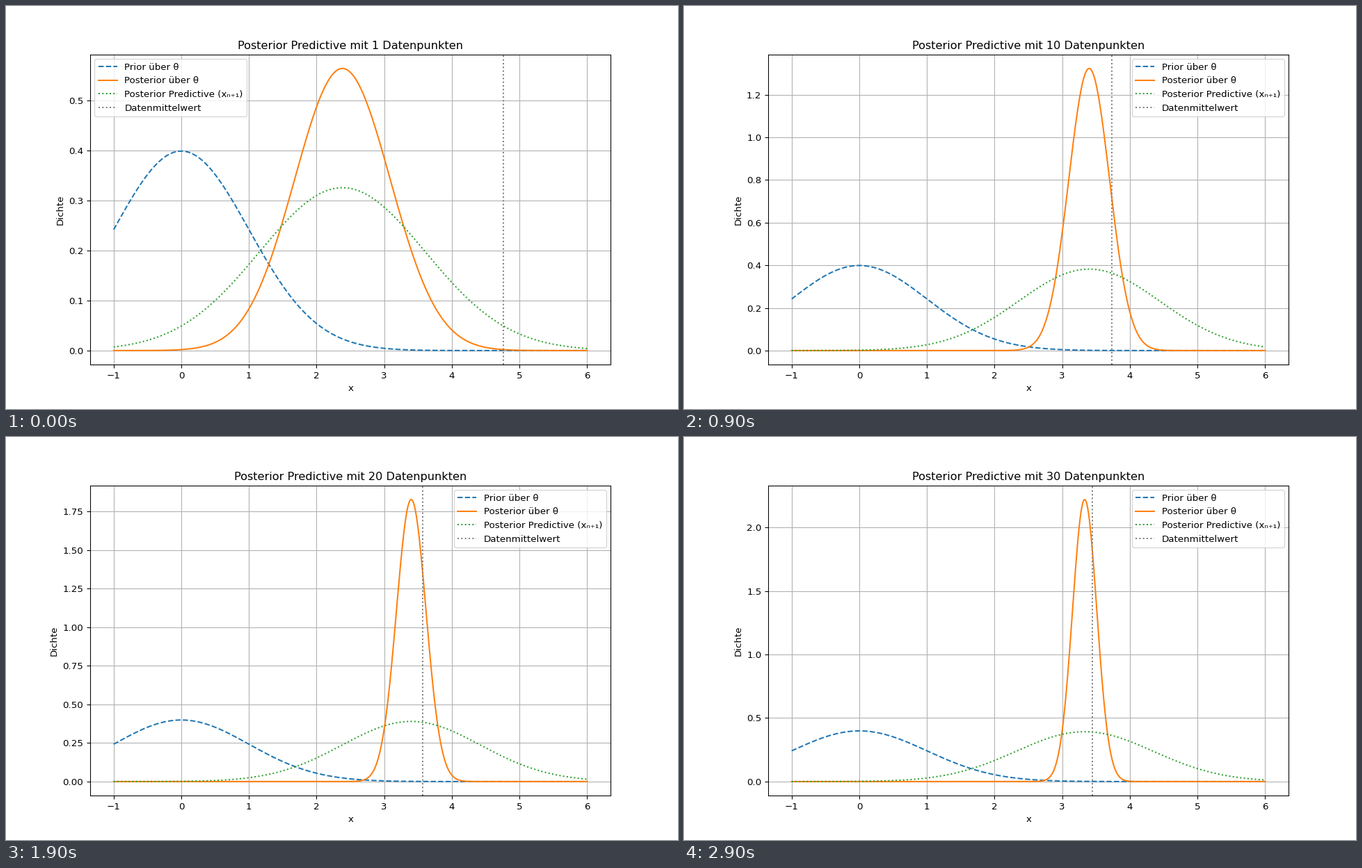
Recreate the animation shown at these times as a matplotlib script. Size 966x580 px, loop 3 s.

```python
import numpy as np
import matplotlib.pyplot as plt
from matplotlib.animation import FuncAnimation

WIDTH, HEIGHT, DPI = 966, 580, 96.6
N_POINTS = 30
PRIOR_MEAN, PRIOR_VAR, NOISE_VAR = 0.0, 1.0, 1.0

np.random.seed(0)
data = np.random.normal(3.0, 1.0, N_POINTS)
x = np.linspace(-1, 6, 500)


def normal_pdf(x, mean, var):
    return np.exp(-(x - mean) ** 2 / (2 * var)) / np.sqrt(2 * np.pi * var)


# The tiny margin keeps the pixel size from being rounded down.
fig, ax = plt.subplots(
    figsize=((WIDTH + 1e-6) / DPI, (HEIGHT + 1e-6) / DPI), dpi=DPI)


def update(frame):
    n = frame + 1
    sample = data[:n]
    mean = sample.mean()
    post_var = 1 / (1 / PRIOR_VAR + n / NOISE_VAR)
    post_mean = post_var * (PRIOR_MEAN / PRIOR_VAR + sample.sum() / NOISE_VAR)

    ax.clear()
    ax.plot(x, normal_pdf(x, PRIOR_MEAN, PRIOR_VAR), "--",
            label="Prior über θ")
    ax.plot(x, normal_pdf(x, post_mean, post_var), label="Posterior über θ")
    ax.plot(x, normal_pdf(x, post_mean, post_var + NOISE_VAR), ":",
            label="Posterior Predictive (xₙ₊₁)")
    ax.axvline(mean, color="gray", linestyle=":", label="Datenmittelwert")

    ax.set_title(f"Posterior Predictive mit {n} Datenpunkten")
    ax.set_xlabel("x")
    ax.set_ylabel("Dichte")
    ax.grid(True)
    # The legend moves left while the mean line would cross it.
    ax.legend(loc="upper left" if mean > 4.04 else "upper right")
    return ax.get_children()


anim = FuncAnimation(fig, update, frames=N_POINTS, interval=100,
                     repeat=True, repeat_delay=0, blit=False)
plt.show()
```
